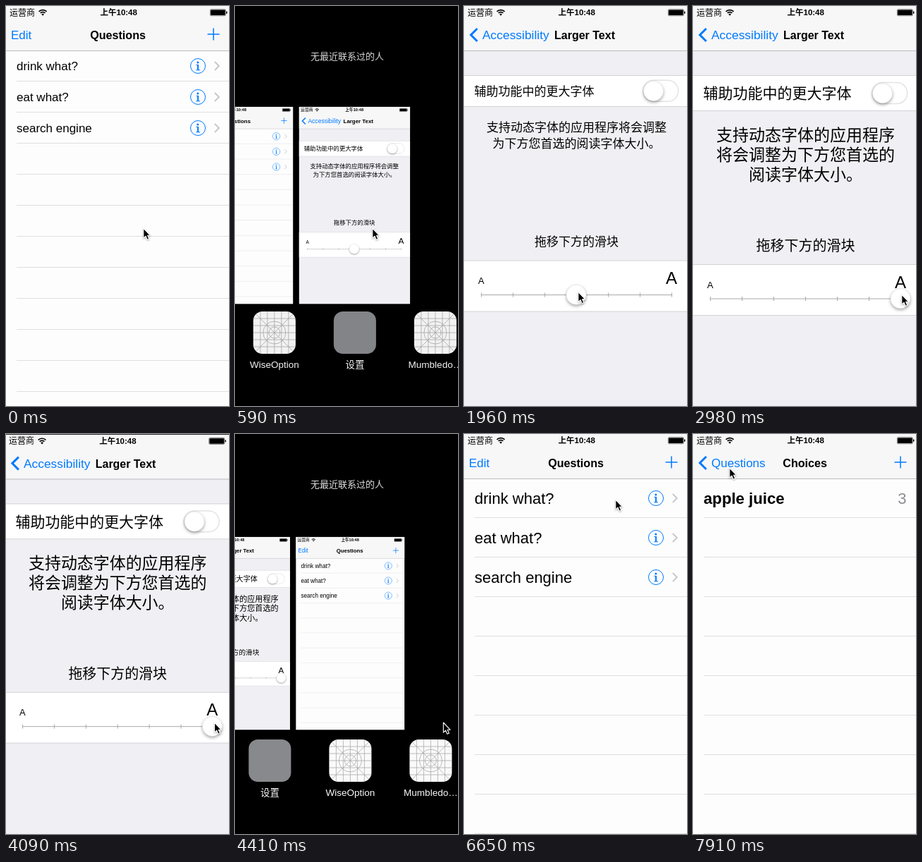
Recreate the animation shown at these times as an HTML page. Size 316x567 px, loop 8000 ms.

```html
<!DOCTYPE html>
<html lang="zh-CN">
<head>
<meta charset="utf-8">
<title>Larger text demo</title>
<style>
  html, body { margin: 0; width: 100%; height: 100%; overflow: hidden; background: #000; }
  svg { display: block; position: absolute; left: 0; top: 0; }
  text {
    font-family: "Liberation Sans", "Noto Sans CJK SC", "Noto Sans CJK", sans-serif;
    font-weight: 300;
    white-space: pre;
  }
  .bold { font-weight: 700; }
  .knob { filter: drop-shadow(0 2px 2px rgba(0, 0, 0, .35)); }
  #cursor { filter: drop-shadow(0 1px 1px rgba(0, 0, 0, .3)); }
</style>
</head>
<body>
<svg id="stage" width="316" height="567" viewBox="0 0 316 567"></svg>
<script>
const LOOP = 8000, BLUE = '#007aff', LINE = '#dfdfe2', PAPER = '#fdfdfd';
const mix = (a, b, f) => a + (b - a) * f;
const clamp = v => Math.min(1, Math.max(0, v));
const smooth = v => v * v * (3 - 2 * v);
const settle = (dt, tau = 92.2) => dt <= 0 ? 0 : 1 - Math.exp(-Math.pow(dt / tau, 1.176));
const times = (n, fn) => Array.from({ length: n }, (_, i) => fn(i)).join('');

// Markup helpers
const text = (x, y, str, size = 17, attrs = '') =>
  `<text x="${x}" y="${y}" font-size="${size}" ${attrs}>${str}</text>`;
const mid = (x, y, str, size, attrs = '') => text(x, y, str, size, 'text-anchor="middle" ' + attrs);
const rect = (x, y, w, h, fill, attrs = '') =>
  `<rect x="${x}" y="${y}" width="${w}" height="${h}" fill="${fill}" ${attrs}/>`;
const path = (d, color, width = 1, attrs = '') =>
  `<path d="${d}" fill="none" stroke="${color}" stroke-width="${width}" ${attrs}/>`;
const group = (id, body, attrs = '') => `<g id="${id}" ${attrs}>${body}</g>`;
const hline = (x, y, color = LINE) => path(`M${x} ${y}H320`, color);
const bold = 'class="bold"';
const blue = `fill="${BLUE}"`;

const statusBar = text(5, 13.5, '运营商', 12) +
  path('M46.6 7.8a7.8 7.8 0 0 1 11 0M48.7 10a4.8 4.8 0 0 1 6.8 0', '#000', 1.7) +
  '<path d="M50.2 11.7a2.6 2.6 0 0 1 3.8 0L52.1 13.8z"/>' +
  mid(159.7, 13.2, '上午10:48', 11.5, bold) +
  rect(289.3, 4.8, 22, 9, 'none', 'rx="1.5" stroke="#000" stroke-width=".5"') +
  rect(290, 5.5, 20.6, 7.6, '#000', 'rx=".8"') + rect(312, 7.5, 1.4, 3.4, '#000', 'rx=".7"');

const navBack = rect(0, 0, 320, 63, '#f7f7f8') + hline(0, 63.5, '#bcbcc0');
const backArrow = path('M18.8 32L9.8 41L18.8 50', BLUE, 3);
const plus = path('M285.5 40H302.5M294 31.5V48.5', BLUE, 1.5);

// Question and choice lists
const info = y => `<circle cx="272" cy="${y}" r="10.5" fill="none" stroke="${BLUE}"/>` +
  `<circle cx="271.8" cy="${y - 5}" r="1.5" ${blue}/>` +
  path(`M269.4 ${y - 1.6}H272V${y + 5.8}M269.2 ${y + 5.8}H275`, BLUE, 1) +
  path(`M272 ${y - 2}V${y + 6}`, BLUE, 1.9);
const arrow = y => path(`M295.8 ${y - 6}L301.8 ${y}L295.8 ${y + 6}`, '#c7c7cc', 1.9);
const rules = h => times(Math.floor(505 / h), i => hline(15, 62.5 + h * (i + 1)));
const list = (h, size) => rect(0, 0, 320, 568, PAPER) +
  (h > 44 ? group('press', rect(0, 63, 320, h, '#d9d9d9')) : '') + rules(h) +
  ['drink what?', 'eat what?', 'search engine'].map((s, i) => {
    const y = 63 + h * (i + .5);
    return text(15, y + size * .36, s, size) + info(y) + arrow(y);
  }).join('');

const questions =
  group('lists', group('small', list(44, 17)) + group('large', list(56, 22))) +
  group('choices', rect(0, 0, 320, 568, PAPER) + rules(56) +
    text(15, 99, 'apple juice', 22.2, bold) +
    text(302.5, 99, '3', 22, 'text-anchor="end" fill="#8e8e93"')) +
  navBack + statusBar + plus +
  group('edit', text(7, 47, 'Edit', 17, blue)) +
  group('title', mid(158.6, 47, 'Questions', 16.1, bold)) +
  group('back', text(26, 47, 'Questions', 17, blue)) +
  group('backArrow', backArrow) +
  group('choiceTitle', mid(158.6, 47, 'Choices', 16.1, bold));

// Settings, one layout per text size
const white = (y0, y1) => rect(0, y0, 320, y1 - y0, '#fff') +
  hline(0, y0, '#d3d3d8') + hline(0, y1, '#d3d3d8');
const knob = '<circle class="knob" r="14" fill="#fff" stroke="#ddd" stroke-width=".5"/>';
const shift = level => level * 5.5 / 3;

function settingsLayout(level) {
  const f = level / 3, m = (a, b) => mix(a, b, f), size = m(17, 23);
  const mark = m(120.3, 123.5);
  const lines = level < 2
    ? ['支持动态字体的应用程序将会调整', '为下方您首选的阅读字体大小。']
    : ['支持动态字体的应用程序', '将会调整为下方您首选的', '阅读字体大小。'];
  const slider = `<g transform="translate(0 ${shift(level)})">` + white(361, 433) +
    mid(24.3, 394.3, 'A', 13) + mid(294, 394.3, 'A', 24) +
    path('M24 409.5H294' + times(7, i => `M${24.5 + 45 * i} 406.5v6`), '#a9a9ad') + '</g>';
  return white(98.5, m(142.5, 148.5)) +
    text(14.5, mark + m(17, 21) * .38, '辅助功能中的更大字体', m(17, 21)) +
    rect(253.7, mark - 15, 50, 30, '#fff', 'rx="15" stroke="#e3e3e5" stroke-width="1.5"') +
    `<g transform="translate(268.5 ${mark + .3})">${knob}</g>` +
    lines.map((s, i) => mid(159.5, m(172, 183) + i * m(22.6, 28) + size * .35, s, size)).join('') +
    mid(159.5, m(334, 340) + m(17, 20) * .34, '拖移下方的滑块', m(17, 20)) + slider;
}

const settings = rect(0, 0, 320, 568, '#efeff4') + navBack + statusBar + backArrow +
  text(26, 47, 'Accessibility', 17.4, blue) + text(128, 47, 'Larger Text', 16, bold) +
  times(4, i => group('size' + i, settingsLayout(i))) + group('thumb', knob);

// Switcher icons, centred on x = 0
const gridIcon = rect(-30, 433, 60, 60, '#fff', 'rx="13"') +
  '<g fill="none" stroke="#a4a4a8" stroke-width=".7" transform="translate(0 463)">' +
  [8, 16].map(r => `<circle r="${r}"/>`).join('') +
  `<path d="M-26 -26L26 26M26 -26L-26 26${
    [-20, -10, 0, 10, 20].map(v => `M${v} -30V30M-30 ${v}H30`).join('')}"/></g>`;
const appIcon = (id, label, art) => group(id, art + mid(0, 512.7, label, 13.5, 'fill="#fff"'));

const stage = document.getElementById('stage');
stage.innerHTML = rect(0, 0, 316, 567, '#000') +
  group('switcher', mid(159, 75.5, '无最近联系过的人', 13, 'fill="#e4e4e4"') +
    appIcon('icon0', 'WiseOption', gridIcon) +
    appIcon('icon1', '设置', rect(-30, 433, 60, 60, '#8b8c8f', 'rx="13"')) +
    appIcon('icon2', 'Mumbledo…', gridIcon)) +
  ['card0', 'card1'].map((id, i) =>
    group(id, i ? settings : questions, 'clip-path="url(#screen)"')).join('') +
  '<clipPath id="screen"><rect width="320" height="568"/></clipPath>' +
  group('cursor', '<path d="M.8 0V14.2L4 11.2L6.2 16.3L8.8 15.2L6.6 10.3H10.6Z" ' +
    'stroke="#fff" stroke-width="1.1" stroke-linejoin="round"/>');

const el = {};
stage.querySelectorAll('[id]').forEach(n => el[n.id] = n);
const move = (node, x, y = 0, s = 1) =>
  node.setAttribute('transform', `translate(${x} ${y})` + (s === 1 ? '' : ` scale(${s})`));
const fade = (id, v) => el[id].setAttribute('opacity', v);
const show = (id, on) => el[id].setAttribute('display', on ? 'inline' : 'none');

// time, x, y
const pointer = [
  [0, 194, 315], [1620, 194, 315], [2020, 159, 411], [2200, 159, 411], [2800, 295, 409],
  [4480, 294.5, 409], [4860, 225, 367], [5060, 225, 367], [5090, 212, 367], [6080, 212, 367],
  [6650, 214, 93], [7250, 214, 93], [7590, 52, 51], [7740, 52, 51], [7760, 52, 49],
  [7900, 52, 49], [7910, 51, 48], [LOOP, 51, 48]
];
function pointerAt(t) {
  const i = pointer.findIndex(k => k[0] > t), a = pointer[i - 1], b = pointer[i];
  const f = smooth((t - a[0]) / (b[0] - a[0]));
  return [mix(a[1], b[1], f), mix(a[2], b[2], f)];
}

function drawSwitcher(t) {
  const second = t >= 4090;
  const [open, close] = second ? [4090, 5320] : [330, 1210];
  const order = second ? [1, 0, 2] : [0, 1, 2];
  const closing = t >= close;
  let zoom = closing ? settle(t - close) : 1 - settle(t - open);
  if (zoom > .9985) zoom = 1;
  const pan = closing ? 1 : settle(t - open, 113);
  const s = mix(.475, 1, zoom);
  order.forEach((app, i) => {
    if (app < 2) move(el['card' + app],
      156 * (1 - s) + (i - pan) * 337 * s, 281.5 * (1 - s), s);
    move(el['icon' + app], 159.2 + (i - 1) * 114 + 320 * zoom);
  });
  fade('switcher', Math.pow(1 - zoom, 1.5));
}

function drawSettings(t, x) {
  const thumb = t < 2200 ? 159 : t < 2800 ? Math.min(294, x) : 294;
  const level = Math.round((thumb - 159) / 45);
  for (let i = 0; i < 4; i++) show('size' + i, i === level);
  move(el.thumb, thumb, 409.3 + shift(level));
}

function drawQuestions(t) {
  const p = settle(t - 6930, 130);
  fade('large', clamp((t - 5800) / 200));
  show('press', t >= 6860);
  move(el.lists, -96 * p);
  move(el.choices, 320 * (1 - p));
  fade('edit', 1 - p);
  move(el.title, -94 * p);
  fade('title', 1 - p);
  move(el.back, 94 * (1 - p));
  fade('back', p);
  fade('backArrow', p);
  move(el.choiceTitle, 160 * (1 - p));
  fade('choiceTitle', p);
}

function draw(now) {
  const t = now % LOOP, [x, y] = pointerAt(t);
  drawSwitcher(t);
  drawSettings(t, x);
  drawQuestions(t);
  move(el.cursor, x, y);
}

const start = performance.now();
function tick() {
  draw(performance.now() - start);
  requestAnimationFrame(tick);
}
tick();
</script>
</body>
</html>
```
